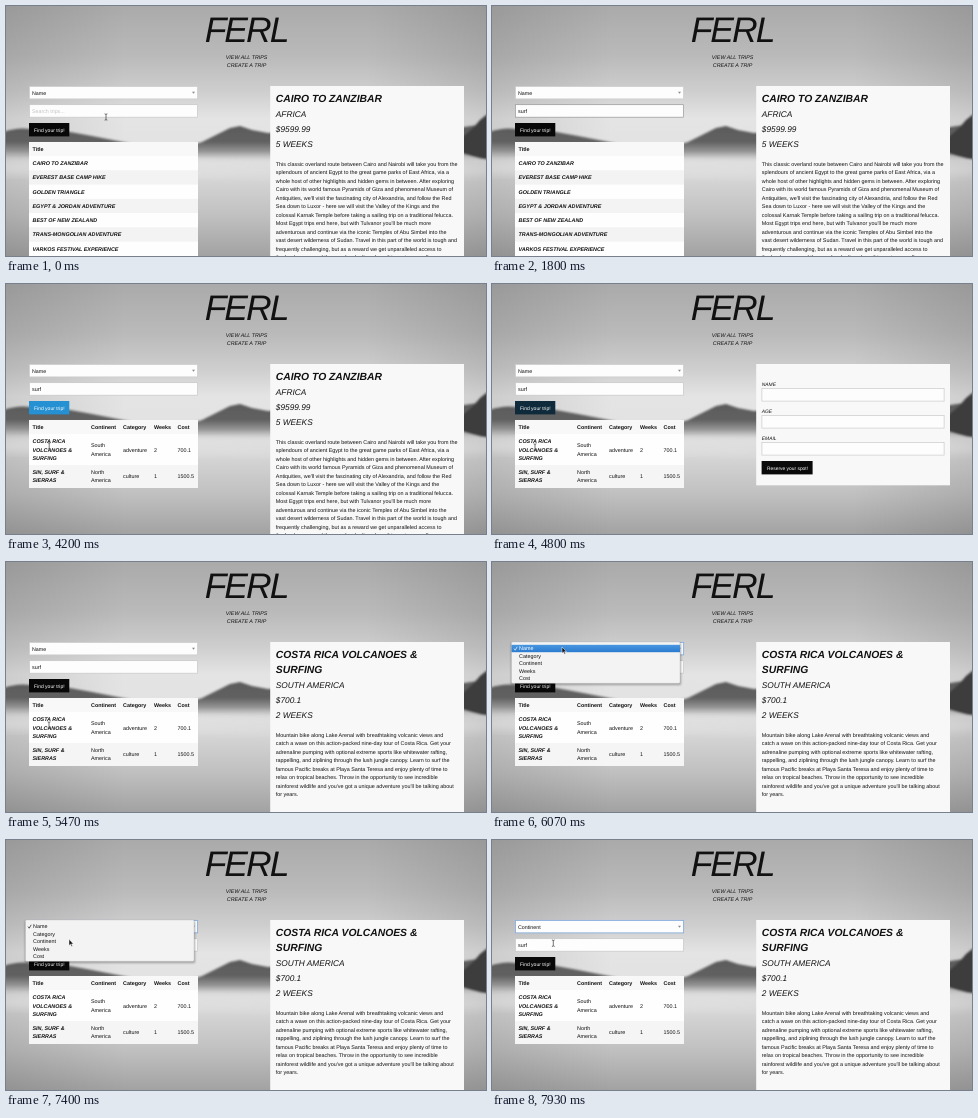
Recreate the animation shown at these times as an HTML page. Size 480 px wide and 250 px high, loop 8000 ms.

```html
<!DOCTYPE html>
<html lang="en">
<head>
<meta charset="utf-8">
<title>Trip search</title>
<style>
  html, body { margin: 0; width: 100%; height: 100%; overflow: hidden; background: #b4b4b4; }
  svg { display: block; width: 480px; height: 250px; }
  text { font-family: "Liberation Sans", Arial, sans-serif; text-rendering: geometricPrecision; white-space: pre; }
  .b { font-weight: 700; }
  .i { font-style: italic; }
</style>
</head>
<body>
<svg id="stage" viewBox="0 0 480 250" xmlns="http://www.w3.org/2000/svg">
  <defs>
    <linearGradient id="sky" x2="0" y2="1">
      <stop offset="0" stop-color="#aaa"/>
      <stop offset=".2" stop-color="#bababa"/>
      <stop offset=".34" stop-color="#cecece"/>
      <stop offset=".45" stop-color="#e4e4e4"/>
      <stop offset=".6" stop-color="#e2e2e2"/>
      <stop offset=".7" stop-color="#d4d4d4"/>
      <stop offset=".84" stop-color="#c0c0c0"/>
      <stop offset="1" stop-color="#a2a2a2"/>
    </linearGradient>
    <linearGradient id="edge">
      <stop offset="0" stop-opacity=".1"/>
      <stop offset=".25" stop-opacity="0"/>
      <stop offset=".75" stop-opacity="0"/>
      <stop offset="1" stop-opacity=".1"/>
    </linearGradient>
    <linearGradient id="hill" gradientUnits="userSpaceOnUse" y1="118" x2="0" y2="158">
      <stop offset="0" stop-color="#5a5a5a"/>
      <stop offset=".45" stop-color="#626262"/>
      <stop offset=".7" stop-color="#999"/>
      <stop offset="1" stop-color="#d8d8d8" stop-opacity="0"/>
    </linearGradient>
    <linearGradient id="mark" x2="0" y2="1">
      <stop offset="0" stop-color="#4a97e0"/>
      <stop offset="1" stop-color="#2a7bd0"/>
    </linearGradient>
    <filter id="soft"><feGaussianBlur stdDeviation=".8"/></filter>
    <filter id="mist"><feGaussianBlur stdDeviation="5"/></filter>
  </defs>
  <rect width="480" height="250" fill="url(#sky)"/>
  <rect width="480" height="250" fill="url(#edge)"/>
  <g filter="url(#soft)">
    <path fill="url(#hill)" d="M-5 127 Q10 121 24 123 T64 126 L86 130 L122 137 L150 144 V160 H-5Z"/>
    <path fill="url(#hill)" d="M176 142 L196 136 L212 128 L224 122 L234 120 L246 124 L262 127 L300 124 L400 126 L452 122 L485 117 V160 H176Z"/>
    <path fill="#3c3c3c" d="M450 136 L460 128 L468 121 L474 114 L485 105 V154 Q468 152 450 145Z"/>
  </g>
  <ellipse cx="120" cy="162" rx="150" ry="9" fill="#e2e2e2" opacity=".6" filter="url(#mist)"/>
  <ellipse cx="330" cy="164" rx="160" ry="9" fill="#dedede" opacity=".6" filter="url(#mist)"/>
</svg>
<script>
const NS = 'http://www.w3.org/2000/svg';
const stage = document.getElementById('stage');
const INK = '#111', BLUE = [37, 144, 210];

function add(parent, tag, attrs = {}, content) {
  const el = document.createElementNS(NS, tag);
  for (const k in attrs) el.setAttribute(k, attrs[k]);
  if (content !== undefined) el.textContent = content;
  parent.appendChild(el);
  return el;
}
const group = (parent = stage) => add(parent, 'g');
const box = (g, x, y, w, h, fill, more) => add(g, 'rect', { x, y, width: w, height: h, fill, ...more });
const field = (g, x, y, w, h) => box(g, x + .4, y + .4, w - .8, h - .8, '#fdfdfd', { stroke: '#cacaca', 'stroke-width': .7 });
// y is the middle of the capitals
const label = (g, x, y, size, str, cls = '', more = {}) =>
  add(g, 'text', { x, y: y + size * .35, 'font-size': size, fill: INK, class: cls, ...more }, str);
const lines = (g, x, y, step, size, list, cls) =>
  list.forEach((str, n) => label(g, x, y + n * step, size, str, cls));
const show = (el, on) => el.setAttribute('visibility', on ? 'visible' : 'hidden');

// Header
label(stage, 240, 24, 35.5, 'FERL', 'i', { 'text-anchor': 'middle', 'letter-spacing': -2 });
label(stage, 240.6, 51.2, 5.35, 'VIEW ALL TRIPS', 'i', { 'text-anchor': 'middle' });
label(stage, 240.6, 59.6, 5.35, 'CREATE A TRIP', 'i', { 'text-anchor': 'middle' });

// Search controls
const select = field(stage, 23, 80, 169, 13.3);
const choice = label(stage, 26, 86.7, 5.3, 'Name');
add(stage, 'path', { d: 'M186 85.8h3l-1.5 2z', fill: '#888' });
const input = field(stage, 23, 98.3, 169, 13.3);
const hint = label(stage, 26, 105, 5.3, 'Search trips...', '', { fill: '#c4c4c4' });
const typed = label(stage, 26, 105, 5.4, '');
const caret = box(stage, 26, 102, .6, 6, '#222');
const button = box(stage, 23, 117, 40.3, 13.4, '#0a0a0a');
label(stage, 28, 123.8, 5, 'Find your trip!', '', { fill: '#fff' });

// All trips
const allTrips = group();
box(allTrips, 23, 136, 169, 114, '#fefefe');
box(allTrips, 23, 136, 169, 14, '#f8f8f8');
label(allTrips, 26.5, 143.2, 5.4, 'Title', 'b');
['CAIRO TO ZANZIBAR', 'EVEREST BASE CAMP HIKE', 'GOLDEN TRIANGLE', 'EGYPT & JORDAN ADVENTURE',
 'BEST OF NEW ZEALAND', 'TRANS-MONGOLIAN ADVENTURE', 'VARKOS FESTIVAL EXPERIENCE'].forEach((name, n) => {
  const y = 157.2 + n * 14.25;
  if (n % 2) box(allTrips, 23, y - 7.1, 169, 14.2, '#f3f3f3');
  label(allTrips, 26.5, y, 5.4, name, 'b i');
});

// Matching trips
const found = group();
const cols = [26.5, 85, 117, 148, 171.6];
box(found, 23, 136, 169, 68, '#fefefe');
box(found, 23, 136, 169, 14, '#f8f8f8');
box(found, 23, 181, 169, 23, '#f5f5f5');
['Title', 'Continent', 'Category', 'Weeks', 'Cost'].forEach((s, n) => label(found, cols[n], 143.2, 5.4, s, 'b'));
function match(y, title, place, rest) {
  lines(found, cols[0], y - (title.length - 1) * 4.2, 8.4, 5.4, title, 'b i');
  lines(found, cols[1], y - 4.2, 8.4, 5.4, place);
  rest.forEach((s, n) => label(found, cols[n + 2], y, 5.4, s));
}
match(165.8, ['COSTA RICA', 'VOLCANOES &', 'SURFING'], ['South', 'America'], ['adventure', '2', '700.1']);
match(192.2, ['SIN, SURF &', 'SIERRAS'], ['North', 'America'], ['culture', '1', '1500.5']);

// Detail panels
function panel(height) {
  const g = group();
  box(g, 264.2, 80, 193.8, height, '#f9f8f8');
  return g;
}
function trip(title, facts, story) {
  const g = panel(170);
  lines(g, 269.8, 92.7, 14.6, 10.35, title, 'b i');
  const y = 93 + title.length * 15;
  lines(g, 269.8, y, 14.8, 8.3, facts, 'i');
  lines(g, 269.8, y + 50, 8.5, 5.42, story);
  return g;
}
const cairo = trip(['CAIRO TO ZANZIBAR'], ['AFRICA', '$9599.99', '5 WEEKS'], [
  'This classic overland route between Cairo and Nairobi will take you from the',
  'splendours of ancient Egypt to the great game parks of East Africa, via a',
  'whole host of other highlights and hidden gems in between. After exploring',
  'Cairo with its world famous Pyramids of Giza and phenomenal Museum of',
  "Antiquities, we'll visit the fascinating city of Alexandria, and follow the Red",
  'Sea down to Luxor - here we will visit the Valley of the Kings and the',
  'colossal Karnak Temple before taking a sailing trip on a traditional felucca.',
  "Most Egypt trips end here, but with Tulvanor you'll be much more",
  'adventurous and continue via the iconic Temples of Abu Simbel into the',
  'vast desert wilderness of Sudan. Travel in this part of the world is tough and',
  'frequently challenging, but as a reward we get unparalleled access to',
  'the landscapes and the people who live along this route, as well as']);
const costa = trip(['COSTA RICA VOLCANOES &', 'SURFING'], ['SOUTH AMERICA', '$700.1', '2 WEEKS'], [
  'Mountain bike along Lake Arenal with breathtaking volcanic views and',
  'catch a wave on this action-packed nine-day tour of Costa Rica. Get your',
  'adrenaline pumping with optional extreme sports like whitewater rafting,',
  'rappelling, and ziplining through the lush jungle canopy. Learn to surf the',
  'famous Pacific breaks at Playa Santa Teresa and enjoy plenty of time to',
  'relax on tropical beaches. Throw in the opportunity to see incredible',
  "rainforest wildlife and you've got a unique adventure you'll be talking about",
  'for years.']);
const form = panel(121.3);
['NAME', 'AGE', 'EMAIL'].forEach((s, n) => {
  label(form, 269.8, 100.2 + n * 27, 4.9, s, 'i');
  field(form, 269.5, 104.2 + n * 27, 183, 13.3);
});
box(form, 269.6, 177, 51, 13.4, '#0a0a0a');
label(form, 275, 183.8, 4.9, 'Reserve your spot!', '', { fill: '#fff' });

// Drop-down menu
const menu = group();
box(menu, 19, 81, 170, 42, '#000', { opacity: .3, filter: 'url(#soft)' });
box(menu, 19.5, 80, 168.5, 41.3, '#f3f3f3', { rx: 1.2, stroke: '#bdbdbd', 'stroke-width': .4 });
const bar = box(menu, 19.5, 0, 168.5, 7.4, 'url(#mark)');
const tick = add(menu, 'path', { d: 'M22 86.6l1.2 1.6l2-3.4', fill: 'none', 'stroke-width': .7 });
const items = ['Name', 'Category', 'Continent', 'Weeks', 'Cost'].map((s, n) => label(menu, 27, 86.5 + n * 7.42, 5.4, s));

// Pointers, drawn around their hot spot
const cursor = group();
const pointers = {
  beam: 'M-1.4 -3.2Q0 -3.2 0 -2.4Q0 -3.2 1.4 -3.2M0 -2.4V2.4M-1.4 3.2Q0 3.2 0 2.4Q0 3.2 1.4 3.2',
  arrow: 'M0 0V6.2L1.5 4.9L2.5 7.2L3.5 6.8L2.5 4.6H4.4Z',
  hand: 'M-.7 .5Q0 -.5 .6 .5V2.6L3.4 3.2Q4.2 3.5 4 4.6L3.3 7H-.3L-2.5 4.2Q-2.3 3.2 -.7 4.3Z'
};
const looks = {
  beam: { fill: 'none', stroke: '#3a3a3a', 'stroke-width': .7 },
  arrow: { fill: '#111', stroke: '#fff', 'stroke-width': .5 },
  hand: { fill: '#fff', stroke: '#555', 'stroke-width': .4 }
};
for (const k in pointers) pointers[k] = add(cursor, 'path', { d: pointers[k], ...looks[k] });

// Timelines: [ms, value...]
const LOOP = 8000, TICK = 1000 / 15;
const path = [[0, 100, 111], [2070, 100, 111], [2530, 51.5, 120.5], [3530, 51.5, 120.5], [4270, 43, 163],
  [5470, 43, 163], [5870, 70, 85], [6200, 70, 85], [6670, 66, 93], [7000, 66, 93], [7330, 63, 99.3],
  [7800, 63, 99.3], [7930, 61.3, 103.2]];
const shape = [[0, 'beam'], [2130, 'arrow'], [2330, 'hand'], [3670, 'arrow'], [4070, 'beam'], [5530, 'arrow'],
  [5670, 'hand'], [5730, 'arrow'], [7870, 'beam']];
const typing = [[0, ''], [870, 's'], [1070, 'su'], [1130, 'sur'], [1330, 'surf']];
const blink = [[0, 0], [200, 1], [530, 0], [870, 1], [1800, 0], [2300, 1], [2670, 0]];
const glow = [[0, 0], [2270, 0], [2530, 1], [4670, 1], [4730, .62], [4800, .25], [4870, .1], [4930, 0],
  [5600, 0], [5670, .5], [5730, .6], [5800, .2], [5870, 0]];
const picked = [[0, -1], [6070, 0], [6470, 1], [7200, 2], [7400, -1], [7460, 2]];

const at = (list, t) => list.filter(k => k[0] <= t).pop();
function blend(list, t, ease = p => p) {
  const a = at(list, t), b = list[list.indexOf(a) + 1];
  if (!b) return a.slice(1);
  const p = ease((t - a[0]) / (b[0] - a[0]));
  return a.slice(1).map((v, n) => v + (b[n + 1] - v) * p);
}
const smooth = p => p * p * (3 - 2 * p);

function draw(t) {
  const word = at(typing, t)[1];
  hint.setAttribute('opacity', word ? 0 : 1);
  if (typed.textContent !== word) typed.textContent = word;
  caret.setAttribute('x', 26 + (word ? typed.getComputedTextLength() : 0));
  show(caret, at(blink, t)[1]);
  input.setAttribute('stroke', t >= 200 && t < 2870 ? '#969696' : '#c6c6c6');

  const lit = blend(glow, t)[0];
  button.setAttribute('fill', `rgb(${BLUE.map(c => Math.round(8 + (c - 8) * lit))})`);

  show(allTrips, t < 2800);
  show(found, t >= 2800);
  show(cairo, t < 4800);
  show(form, t >= 4800 && t < 4870);
  show(costa, t >= 4870);

  const row = at(picked, t)[1];
  choice.textContent = t < 7460 ? 'Name' : 'Continent';
  select.setAttribute('stroke', t < 6070 ? '#cacaca' : '#86aedd');
  select.setAttribute('stroke-width', t < 6070 ? .7 : .9);
  menu.setAttribute('opacity', t < 6070 ? 0 : Math.max(0, Math.min(1, (7730 - t) / 200)));
  bar.setAttribute('y', 82.8 + row * 7.42);
  bar.setAttribute('opacity', row < 0 ? 0 : 1);
  items.forEach((el, n) => el.setAttribute('fill', n === row ? '#fff' : INK));
  tick.setAttribute('stroke', row ? INK : '#fff');

  const [x, y] = blend(path, t, smooth), kind = at(shape, t)[1];
  cursor.setAttribute('transform', `translate(${x} ${y})`);
  cursor.setAttribute('opacity', t >= 870 && t < 2070 ? 0 : 1);
  for (const k in pointers) show(pointers[k], k === kind);
}

const start = performance.now();
function frame(now) {
  const t = Math.max(0, now - start) % LOOP;
  // The screen refreshes 15 times a second
  draw(Math.round(Math.floor((t + 4) / TICK) * TICK / 10) * 10 % LOOP);
  requestAnimationFrame(frame);
}
draw(0);
requestAnimationFrame(frame);
</script>
</body>
</html>
```
